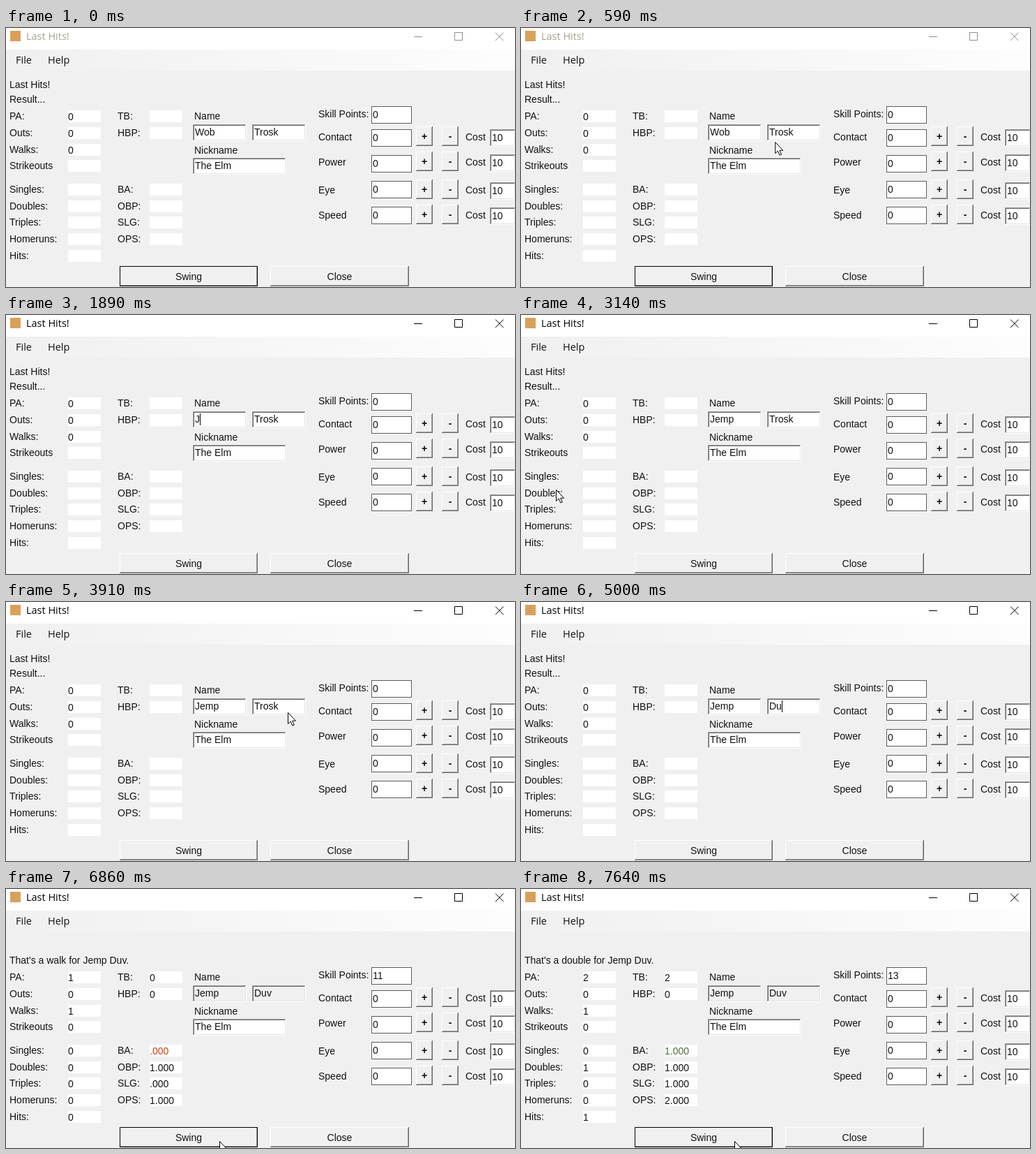
These frames come from a looping animation (730x371 px, 8000 ms). An HTML page:

```html
<!DOCTYPE html>
<html lang="en">
<head>
<meta charset="utf-8">
<title>Last Hits!</title>
<style>
  html, body { margin: 0; width: 100%; height: 100%; overflow: hidden; background: #f0f0f0; }
  svg { display: block; }
  text { font: 14px "Liberation Sans", Arial, sans-serif; fill: #111; white-space: pre; }
  text.ui { font: 14.5px "Open Sans", "Noto Sans", sans-serif; }
  text.sign { font-weight: bold; }
  rect { shape-rendering: crispEdges; }
</style>
</head>
<body>
<svg id="stage" width="730" height="371" viewBox="0 0 730 371">
  <defs>
    <linearGradient id="strip"><stop stop-color="#f0f0f0"/><stop offset="1" stop-color="#fdfdfd"/></linearGradient>
  </defs>
  <rect width="730" height="31" fill="#fff"/>
  <rect y="31" width="730" height="30" fill="url(#strip)"/>
  <rect x="6" y="4" width="15" height="15" fill="#d9a05b"/>
</svg>
<script>
const LOOP = 8000;
const ACTIVATE = 890;
const SWINGS = [6790, 7560];
const CLICK = 70;
const TITLE = 'Last Hits!';
const stage = document.getElementById('stage');
const pen = document.createElement('canvas').getContext('2d');
pen.font = '14px "Liberation Sans", Arial, sans-serif';
const widthOf = s => pen.measureText(s).width;

function add(tag, attrs) {
  const el = document.createElementNS('http://www.w3.org/2000/svg', tag);
  set(el, attrs);
  return stage.appendChild(el);
}
function set(el, attrs) { for (const k in attrs) el.setAttribute(k, attrs[k]); }
const show = (el, on) => set(el, { visibility: on ? 'visible' : 'hidden' });
const box = (x, y, width, height, fill) => add('rect', { x, y, width, height, fill });
function label(x, y, str = '', attrs = {}) {
  const el = add('text', { x, y, ...attrs });
  el.textContent = str;
  return el;
}

// Bevel: light and dark edges around an inner area
function bevel(x, y, w, h, [outerDark, outerLight, innerDark, innerLight], fill) {
  box(x, y, w, h, outerLight);
  box(x, y, w - 1, h - 1, outerDark);
  box(x + 1, y + 1, w - 2, h - 2, innerLight);
  box(x + 1, y + 1, w - 3, h - 3, innerDark);
  return box(x + 2, y + 2, w - 4, h - 4, fill);
}
const SUNKEN = ['#a0a0a0', '#fff', '#696969', '#e3e3e3'];
const RAISED = ['#fff', '#696969', '#f0f0f0', '#a0a0a0'];
const field = (x, y, w, h = 24) => bevel(x, y, w, h, SUNKEN, '#fff');
function flatField(x, y) {
  box(x, y, 58, 25, '#5c5c5c');
  box(x + 1, y + 1, 56, 23, '#fff');
}
function button(x, y, w, h, str, attrs) {
  bevel(x, y, w, h, RAISED, '#f0f0f0');
  return label(x + w / 2, y + h / 2 + 5, str, { 'text-anchor': 'middle', ...attrs });
}

// Title bar and menu
const title = label(29, 17, TITLE, { class: 'ui' });
const controls = add('path', { d: 'M585 12.5H597M643.5 6.5H654.5V17.5H643.5ZM702 6.5L713.5 18M713.5 6.5L702 18', fill: 'none' });
label(14, 51, 'File', { class: 'ui' });
label(60, 51, 'Help', { class: 'ui' });

// Messages and statistics
const heading = label(5, 86, TITLE);
const message = label(5, 107);
const cells = {};
const rowY = i => Math.round(131 + 23.8 * i + (i > 3 ? 9.6 : 0));
function stat(x, valueX, row, name) {
  const y = rowY(row);
  box(valueX, y - 13, 47, 17, '#fff');
  label(x, y, name === 'Strikeouts' ? name : name + ':');
  cells[name] = label(valueX, y + 1);
}
['PA', 'Outs', 'Walks', 'Strikeouts', 'Singles', 'Doubles', 'Triples', 'Homeruns', 'Hits']
  .forEach((name, i) => stat(5, 89, i, name));
['TB', 'HBP', 'BA', 'OBP', 'SLG', 'OPS'].forEach((name, i) => stat(160, 206, i < 2 ? i : i + 2, name));

// Names; each input is selected by dragging and then retyped
const inputs = [
  { x: 268, old: 'Wob', name: 'Jemp', press: 970, release: 1200, keys: [1890, 2060, 2130, 2300] },
  { x: 353, old: 'Trosk', name: 'Duv', press: 4070, release: 4300, keys: [4450, 5000, 5070] }
];
label(270, 131, 'Name');
label(270, 180, 'Nickname');
for (const input of inputs) {
  input.area = field(input.x, 138, 77);
  input.left = input.x + 3;
  input.text = label(input.left, 154);
  input.mark = box(input.left, 142, 0, 16, '#0078d7');
  input.picked = label(input.left, 154, '', { style: 'fill:#fff' });
}
field(268, 186, 134);
label(271, 202, 'The Elm');

// Skills
label(448, 128, 'Skill Points:');
flatField(524, 112);
cells.Skill = label(526, 129);
['Contact', 'Power', 'Eye', 'Speed'].forEach((name, i) => {
  const y = 161 + 36 * i + (i > 1 ? 4 : 0);
  const top = 145 + 37 * i;
  label(448, y, name);
  flatField(524, top);
  label(526, top + 17, '0');
  button(588, y - 20, 24, 28, '+', { class: 'sign' });
  button(625, y - 20, 24, 28, '-', { class: 'sign' });
  label(659, y, 'Cost');
  field(694, y - 16, 37, 25);
  label(697, y + 1, '10');
});

const swing = button(163, 341, 198, 29, 'Swing', {});
const focusRing = add('rect', { x: 163.5, y: 341.5, width: 197, height: 28, fill: 'none', stroke: '#000' });
button(379, 341, 199, 29, 'Close');

// Caret and pointer
const caret = box(0, 141, 1, 17, '#000');
const halo = add('circle', { r: 14.3, fill: '#f0e02d', opacity: .75 });
const arrow = add('path', { d: 'M.5.5V16.5L4.2 13L6.8 19L9.3 18L6.7 12.2H11.5Z', fill: '#fff', stroke: '#000' });
const beam = add('path', {
  d: 'M-3.5-8H-1L0-7L1-8H3.5M0-7V7M-3.5 8H-1L0 7L1 8H3.5', fill: 'none', stroke: '#222', 'stroke-width': 1.2
});

// Pointer glides along a curve, sampled about every 77 ms, and rests until hidden
const glide = (start, end, hide, from, to, via = from.map((v, i) => (v + to[i]) / 2)) =>
  ({ start, end, hide, from, to, via });
const glides = [
  glide(120, 740, 890, [484, 245], [342, 148]),
  glide(890, 970, 1050, [342, 148], [330, 148]),
  glide(1050, 1200, 1200, [330, 148], [268, 150]),
  glide(3140, 3910, 3910, [50, 250], [404, 158], [500, 165]),
  glide(3910, 4070, 4070, [404, 158], [394, 148]),
  glide(4070, 4220, 4300, [394, 148], [350, 144]),
  glide(5700, 5780, 5780, [199, 308], [199, 308]),
  glide(6310, 6620, LOOP, [345, 368], [306, 361])
];
function pointerAt(t) {
  const g = glides.find(g => t >= g.start && t < g.hide);
  if (!g) return null;
  const span = g.end - g.start;
  const n = Math.round(span / 77);
  const u = Math.min(1, Math.floor((t - g.start + 4) / span * n) / n);
  const s = u * u * (3 - 2 * u);
  return g.from.map((a, i) => a * (1 - s) ** 2 + 2 * g.via[i] * s * (1 - s) + g.to[i] * s * s);
}
const overText = ([x, y]) =>
  y > 138 && y < 157 && inputs.some(f => x >= f.x && x < f.x + 77) ||
  y > 186 && y < 210 && x >= 268 && x < 402;

// Scoring
const plays = [{ name: 'walk', bases: 0, points: 11 }, { name: 'double', bases: 2, points: 2 }];
const rate = x => x.toFixed(3).replace(/^0/, '');
function score(done) {
  const pa = done.length;
  if (!pa) return { PA: 0, Outs: 0, Walks: 0, Skill: 0 };
  const sum = f => done.reduce((total, play) => total + f(play), 0);
  const hits = n => sum(p => +(p.bases === n));
  const walks = hits(0), atBats = pa - walks;
  const bases = sum(p => p.bases);
  const perBat = x => atBats ? x / atBats : 0;
  const onBase = pa / pa, slugging = Math.min(1, perBat(bases) / 2);
  return {
    PA: pa, Outs: 0, Walks: walks, Strikeouts: 0,
    Singles: hits(1), Doubles: hits(2), Triples: hits(3), Homeruns: hits(4), Hits: atBats,
    TB: bases, HBP: 0, BA: rate(perBat(atBats)), OBP: rate(onBase),
    SLG: rate(slugging), OPS: rate(onBase + slugging), Skill: sum(p => p.points)
  };
}

// Text and caret position of an input; the caret follows the drag, then the typing
function edit(input, t, pointer) {
  const { old, name, press, release, keys, left } = input;
  const typed = keys.filter(k => k <= t).length;
  const text = typed ? name.slice(0, typed) : old;
  let cut = text.length;
  if (!typed && t >= release) cut = 0;
  else if (!typed && t >= press)
    cut = [...old].filter((c, i) => left + widthOf(old.slice(0, i)) + widthOf(c) / 2 < pointer[0]).length;
  return { text, cut };
}
function caretOn(input, t) {
  const last = Math.max(...[input.press, input.release, ...input.keys].filter(k => k <= t));
  return (t - last + 60) % 1060 < 530;
}

function draw(t) {
  const active = t >= ACTIVATE;
  title.style.fill = active ? '#000' : '#aaa08f';
  set(controls, { stroke: active ? '#000' : '#8c8c8c' });

  const done = plays.filter((_, i) => t >= SWINGS[i] + CLICK);
  const started = done.length > 0;
  const board = score(done);
  for (const name in cells) cells[name].textContent = board[name] ?? '';
  cells.BA.style.fill = +board.BA > .3 ? '#4a7040' : '#d23c14';
  show(heading, !started);
  message.textContent = started
    ? `That's a ${done[done.length - 1].name} for ${inputs.map(i => i.name).join(' ')}.` : 'Result...';

  const pointer = pointerAt(t);
  const playing = t >= SWINGS[0];
  const focus = playing ? null : inputs.filter(i => t >= i.press).pop();
  for (const input of inputs) {
    const { text, cut } = edit(input, t, pointer);
    const x = input.left + widthOf(text.slice(0, cut));
    input.text.textContent = text.slice(0, cut);
    input.picked.textContent = text.slice(cut);
    set(input.picked, { x });
    set(input.mark, { x, width: widthOf(text.slice(cut)) });
    set(input.area, { fill: started ? '#f0f0f0' : '#fff' });
    if (input === focus) set(caret, { x: Math.round(x) });
  }
  show(caret, focus && caretOn(focus, t));

  const dragging = focus && t < focus.release;
  const swinging = SWINGS.some(s => t >= s && t < s + CLICK);
  show(focusRing, playing || t < inputs[0].press);
  set(swing, { transform: swinging ? 'translate(1 1)' : '' });

  const text = pointer && (dragging || overText(pointer));
  show(arrow, pointer && !text);
  show(beam, text);
  show(halo, pointer && (dragging || swinging));
  if (pointer) {
    const transform = `translate(${pointer})`;
    set(arrow, { transform });
    set(beam, { transform });
    set(halo, { cx: pointer[0] - 2, cy: pointer[1] });
  }
}

const origin = performance.now();
function tick() {
  draw((performance.now() - origin) % LOOP);
  requestAnimationFrame(tick);
}
draw(0);
requestAnimationFrame(tick);
</script>
</body>
</html>
```
